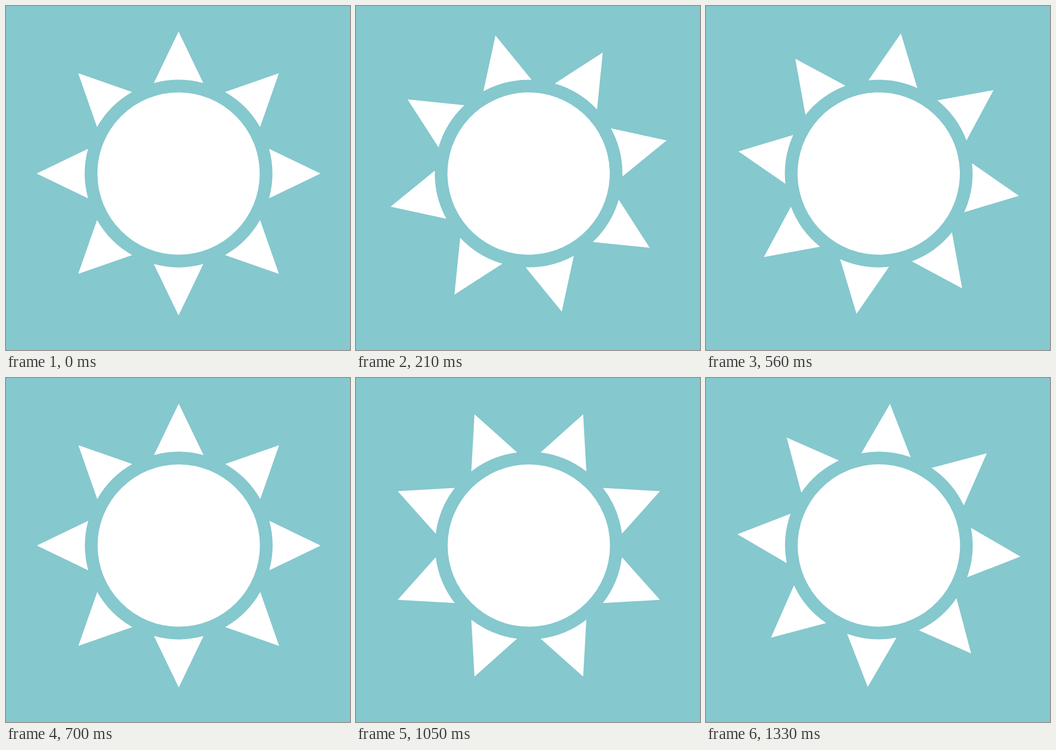
Animation, 618 px wide and 618 px high, one loop 1400 ms. Source, as an HTML page:

```html
<!DOCTYPE html>
<html lang="en">
<head>
<meta charset="utf-8">
<title>Turning sun</title>
<style>
  html, body { margin: 0; height: 100%; overflow: hidden; background: #85c8ce; }
  svg { display: block; width: 618px; height: 618px; }
</style>
</head>
<body>
<svg viewBox="0 0 618 618" fill="#fff">
  <g id="sun"><circle r="145.8"/></g>
</svg>
<script>
  const LOOP = 1400, STEP = 70, STEP_ANGLE = -4.5, RAYS = 8;
  const sun = document.getElementById('sun');

  for (let i = 0; i < RAYS; i++) {
    const ray = document.createElementNS('http://www.w3.org/2000/svg', 'path');
    ray.setAttribute('d', 'M0-255L44.5-162.6A168.6 168.6 0 0 0-44.5-162.6Z');
    ray.setAttribute('transform', `rotate(${i * 360 / RAYS})`);
    sun.append(ray);
  }

  const start = performance.now();

  function draw(now) {
    const time = Math.max(0, now - start) % LOOP;
    const angle = Math.floor(time / STEP) * STEP_ANGLE;
    // The sun sits slightly off its pivot
    sun.setAttribute('transform', `translate(310.2 300.6) rotate(${angle}) translate(-.2 .4)`);
    requestAnimationFrame(draw);
  }
  draw(start);
</script>
</body>
</html>
```
